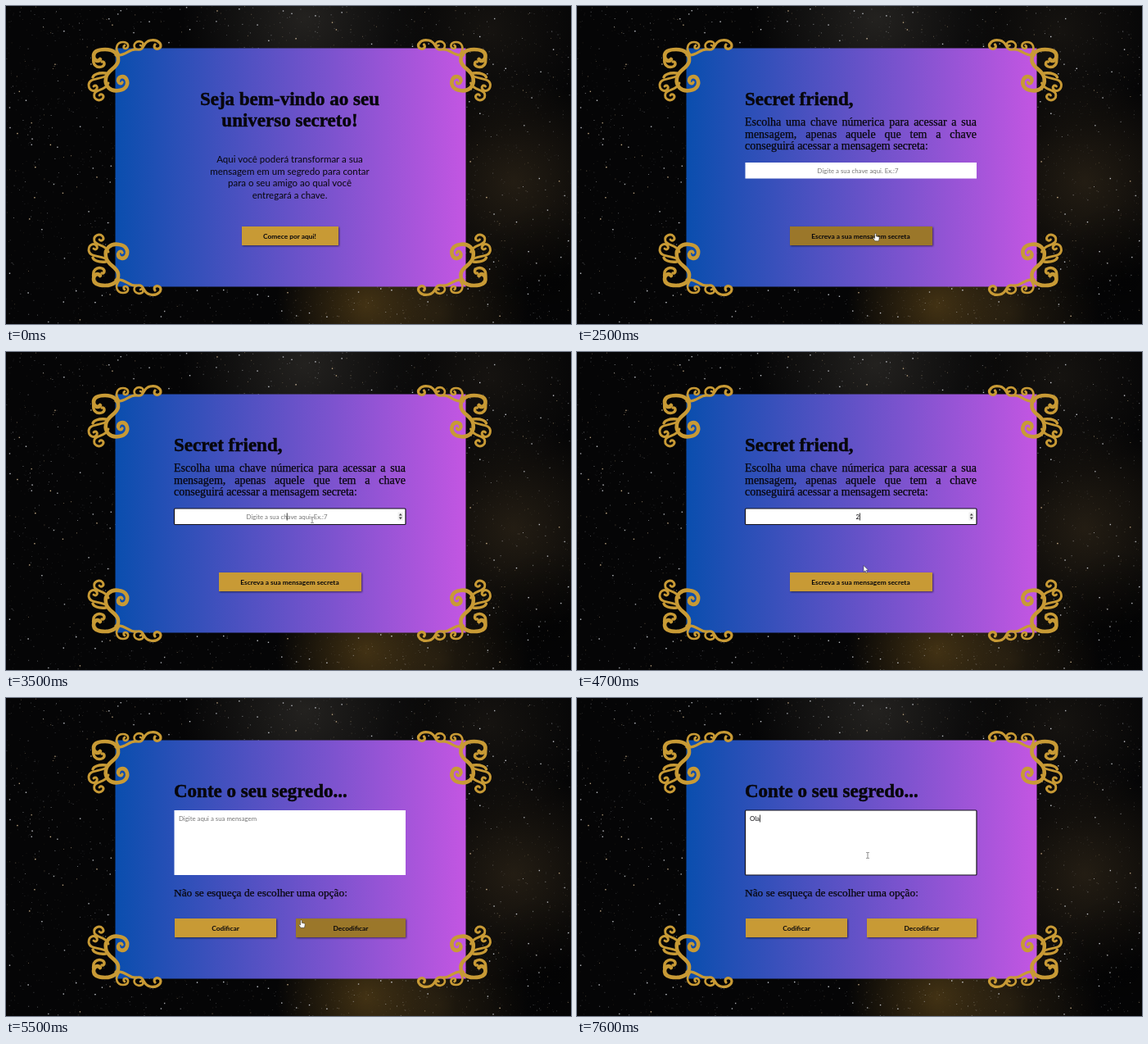
These frames come from a looping animation (690x388 px, 8 s). An HTML page with a canvas:

```html
<!DOCTYPE html>
<html lang="pt-BR">
<head>
<meta charset="utf-8">
<title>Universo secreto</title>
<style>
html, body { margin: 0; width: 100%; height: 100%; overflow: hidden; background: #050505; }
canvas, svg { position: absolute; left: 0; top: 0; width: 690px; height: 388px; }
text { font-family: Lato, sans-serif; fill: #08070c; white-space: pre; }
.mid { text-anchor: middle; }
.title { font: bold 23px "Liberation Serif", serif; stroke: #08070c; stroke-width: .5; }
.serif, .note { font-family: "Liberation Serif", serif; font-size: 14px; }
.serif { font-size: 13.4px; stroke: #08070c; stroke-width: .25; }
.body { font-size: 11.5px; }
.label { font-size: 8.4px; font-weight: bold; }
.field { font-size: 7.8px; }
.hint { fill: #757575; }
.note { color: #08070c; line-height: 14.5px; -webkit-text-stroke: .25px #08070c; }
.note div { text-align-last: justify; white-space: nowrap; }
.note div:last-child { text-align-last: left; }
.button { fill: #c89a35; filter: drop-shadow(1.5px 1.5px 1px rgba(0,0,0,.55)); }
.button.hover { fill: #9b772a; }
.ring { fill: none; stroke: #15131c; stroke-width: 1.2; }
.caret { fill: #111; }
</style>
</head>
<body>
<canvas id="sky" width="690" height="388"></canvas>
<svg viewBox="0 0 690 388">
  <defs>
    <linearGradient id="fade"><stop stop-color="#0a4eae"/><stop offset="1" stop-color="#c356e2"/></linearGradient>
    <g id="scroll" fill="none" stroke="#c89a35" stroke-linecap="round" stroke-linejoin="round">
      <path stroke-width="4.6" d="M115 65C112 69 107 66 107 61C107 54 114 53 121 53C131 53 138 58 137 67C136 76 123 78 122 88C120 98 128 105 138 103C147 102 150 95 147 89C144 84 137 86 137 91"/>
      <path stroke-width="3.4" d="M107 62C105 72 111 76 117 74C122 72 120 67 117 68M122 82C112 81 107 84 106 87M137 91C137 95 141 96 142 93"/>
      <path stroke-width="2.9" d="M121 86C111 90 102 88 101 96C101 103 107 105 110 102C113 99 110 95 107 98M125 94C122 103 111 101 108 107C106 114 114 117 118 113C121 109 116 106 114 109"/>
      <path stroke-width="3.2" d="M134 60C147 62 150 51 160 53C170 55 166 44 176 42C186 40 191 47 188 51C184 54 179 51 182 47"/>
      <path stroke-width="2.7" d="M138 59C132 51 136 44 143 44C150 44 151 51 146 52C143 52 143 49 145 48M159 53C153 48 159 41 166 44C169 46 167 50 164 48"/>
    </g>
  </defs>
  <rect x="133.5" y="51.5" width="428" height="291" fill="url(#fade)"/>
  <use href="#scroll"/>
  <use href="#scroll" transform="matrix(-1 0 0 1 692.5 0)"/>
  <use href="#scroll" transform="matrix(1 0 0 -1 0 394)"/>
  <use href="#scroll" transform="matrix(-1 0 0 -1 692.5 394)"/>

  <g id="welcome" class="mid">
    <text class="title" x="346.5" y="121">Seja bem-vindo ao seu</text>
    <text class="title" x="346.5" y="146.5">universo secreto!</text>
    <g class="body">
      <text x="346.5" y="190.5">Aqui você poderá transformar a sua</text>
      <text x="346.5" y="205.5">mensagem em um segredo para contar</text>
      <text x="346.5" y="220.3">para o seu amigo ao qual você</text>
      <text x="346.5" y="235.2">entregará a chave.</text>
    </g>
    <rect id="start" class="button" x="288" y="269" width="118" height="23"/>
    <text class="label" x="346.5" y="284">Comece por aqui!</text>
  </g>

  <g id="choose">
    <text class="title" x="205" y="121">Secret friend,</text>
    <foreignObject x="205" y="135" width="283" height="48">
      <div class="note">
        <div>Escolha uma chave númerica para acessar a sua</div>
        <div>mensagem, apenas aquele que tem a chave</div>
        <div>conseguirá acessar a mensagem secreta:</div>
      </div>
    </foreignObject>
    <rect x="205.5" y="191" width="282.5" height="19.5" fill="#fff"/>
    <text id="keyHint" class="field hint mid" x="343" y="203.6">Digite a sua chave aqui. Ex.:7</text>
    <text id="key" class="field mid" x="342.8" y="203.6"></text>
    <g id="spin">
      <rect x="478.5" y="195.5" width="6.5" height="10" fill="#efefef"/>
      <path d="M479.8 199.6l2-2.6 2 2.6zM479.8 201.6l2 2.6 2-2.6z" fill="#444"/>
    </g>
    <rect id="keyRing" class="ring" x="205.5" y="191" width="282.5" height="19.5" rx="1"/>
    <rect id="keyCaret" class="caret" y="196.5" width=".8" height="9"/>
    <rect id="write" class="button" x="260" y="269" width="174" height="23"/>
    <text class="label mid" x="346.5" y="284">Escreva a sua mensagem secreta</text>
  </g>

  <g id="tell">
    <text class="title" x="205" y="121">Conte o seu segredo...</text>
    <rect x="205.5" y="137" width="282.5" height="79" fill="#fff"/>
    <text id="msgHint" class="field hint" x="211" y="149.8">Digite aqui a sua mensagem</text>
    <text id="msg" class="field" x="211" y="149.8"></text>
    <rect id="msgRing" class="ring" x="205.5" y="137" width="282.5" height="79" rx="1"/>
    <rect id="msgCaret" class="caret" y="142.5" width=".8" height="9"/>
    <text class="serif" x="205" y="242">Não se esqueça de escolher uma opção:</text>
    <rect class="button" x="206" y="269" width="124" height="23"/>
    <text class="label mid" x="268" y="284">Codificar</text>
    <rect id="decode" class="button" x="354" y="269" width="134" height="23"/>
    <text class="label mid" x="421" y="284">Decodificar</text>
  </g>

  <g id="cursor">
    <path id="arrow" d="M0 0V8L1.9 6.3 3.2 9.2 4.5 8.6 3.2 5.8H5.8z" fill="#fff" stroke="#222" stroke-width=".5"/>
    <path id="hand" d="M-.9.6Q0-.7.9.6V3.4L3.9 4Q4.8 4.3 4.7 5.4L4 9.3H-.6L-3 5.8Q-2.6 4.7-.9 6z" fill="#fff" stroke="#222" stroke-width=".5"/>
    <path id="beam" d="M-1.8-3.5H-.5L0-3 .5-3.5H1.8M0-3V3M-1.8 3.5H-.5L0 3 .5 3.5H1.8" fill="none" stroke="#555" stroke-width=".7"/>
  </g>
</svg>
<script>
const $ = id => document.getElementById(id);
const show = (id, on) => $(id).style.display = on ? '' : 'none';
const hover = (id, on) => $(id).classList.toggle('hover', on);

function paintSky() {
  const c = $('sky').getContext('2d');
  let seed = 7;
  const rnd = () => (seed = seed * 16807 % 2147483647) / 2147483647;
  c.fillStyle = '#050506';
  c.fillRect(0, 0, 690, 388);
  const glow = (x, y, r, rgb, a) => {
    const g = c.createRadialGradient(x, y, 0, x, y, r);
    g.addColorStop(0, `rgba(${rgb},${a})`);
    g.addColorStop(1, `rgba(${rgb},0)`);
    c.fillStyle = g;
    c.fillRect(0, 0, 690, 388);
  };
  glow(365, 15, 150, '60,57,52', .55);
  glow(440, 365, 110, '105,78,28', .6);
  glow(530, 375, 110, '75,58,28', .4);
  glow(620, 215, 130, '65,52,32', .5);
  glow(590, 30, 120, '38,33,26', .5);
  glow(665, 330, 90, '0,0,0', .4);
  for (let i = 0; i < 3600; i++) {
    const x = rnd() * 690, y = rnd() * 388, b = rnd() ** 5;
    const size = b > .75 ? 1.4 : .8 + rnd() * .2;
    c.fillStyle = `rgba(${rnd() < .3 ? '235,205,160' : '225,228,235'},${.1 + b * .8})`;
    c.fillRect(x, y, size, size);
  }
}

// Pointer stops: time, x, y
const path = [[2200, 364.5, 277.5], [3000, 364.5, 277.5], [3400, 374, 205], [4400, 374, 205],
  [4700, 350, 260.5], [5000, 360.5, 271], [5600, 360.5, 271], [5900, 355, 192]];

function pointer(t) {
  const i = path.findIndex(p => p[0] > t);
  if (i < 0) return path.at(-1).slice(1);
  if (!i) return path[0].slice(1);
  const [a, x, y] = path[i - 1], [b, u, v] = path[i];
  const k = (t - a) / (b - a), e = k * k * (3 - 2 * k);
  return [x + (u - x) * e, y + (v - y) * e];
}

function draw(t) {
  const page = t < 2200 ? 0 : t < 5300 ? 1 : 2;
  ['welcome', 'choose', 'tell'].forEach((id, i) => show(id, i === page));

  const [x, y] = pointer(t);
  const onButton = y >= 269;
  const onField = page === 1 ? y > 191 && y < 211 : y > 137 && y < 216;
  show('cursor', page);
  $('cursor').setAttribute('transform', `translate(${x} ${y})`);
  show('hand', onButton);
  show('beam', onField);
  show('arrow', !onButton && !onField);
  hover('start', t >= 1900);
  hover('write', onButton);
  hover('decode', onButton);

  if (page === 1) {
    const focus = t >= 3400, typed = t >= 4400;
    $('key').textContent = typed ? '2' : '';
    show('keyHint', !typed);
    show('keyRing', focus);
    show('spin', focus || onField);
    show('keyCaret', focus && (t - 3400) % 1000 < 500);
    $('keyCaret').setAttribute('x', 342.8 + $('key').getComputedTextLength() / 2);
  }
  if (page === 2) {
    const typed = 'Ola'.slice(0, t < 7200 ? 0 : t < 7400 ? 1 : t < 7600 ? 2 : 3);
    $('msg').textContent = typed;
    show('msgHint', !typed);
    show('msgRing', t >= 5900);
    show('msgCaret', t >= 5900 && t < 6400 || t >= 7000);
    $('msgCaret').setAttribute('x', 211.2 + $('msg').getComputedTextLength());
  }
}

paintSky();
const begin = performance.now();
(function tick() {
  draw((performance.now() - begin) % 8000);
  requestAnimationFrame(tick);
})();
</script>
</body>
</html>
```
